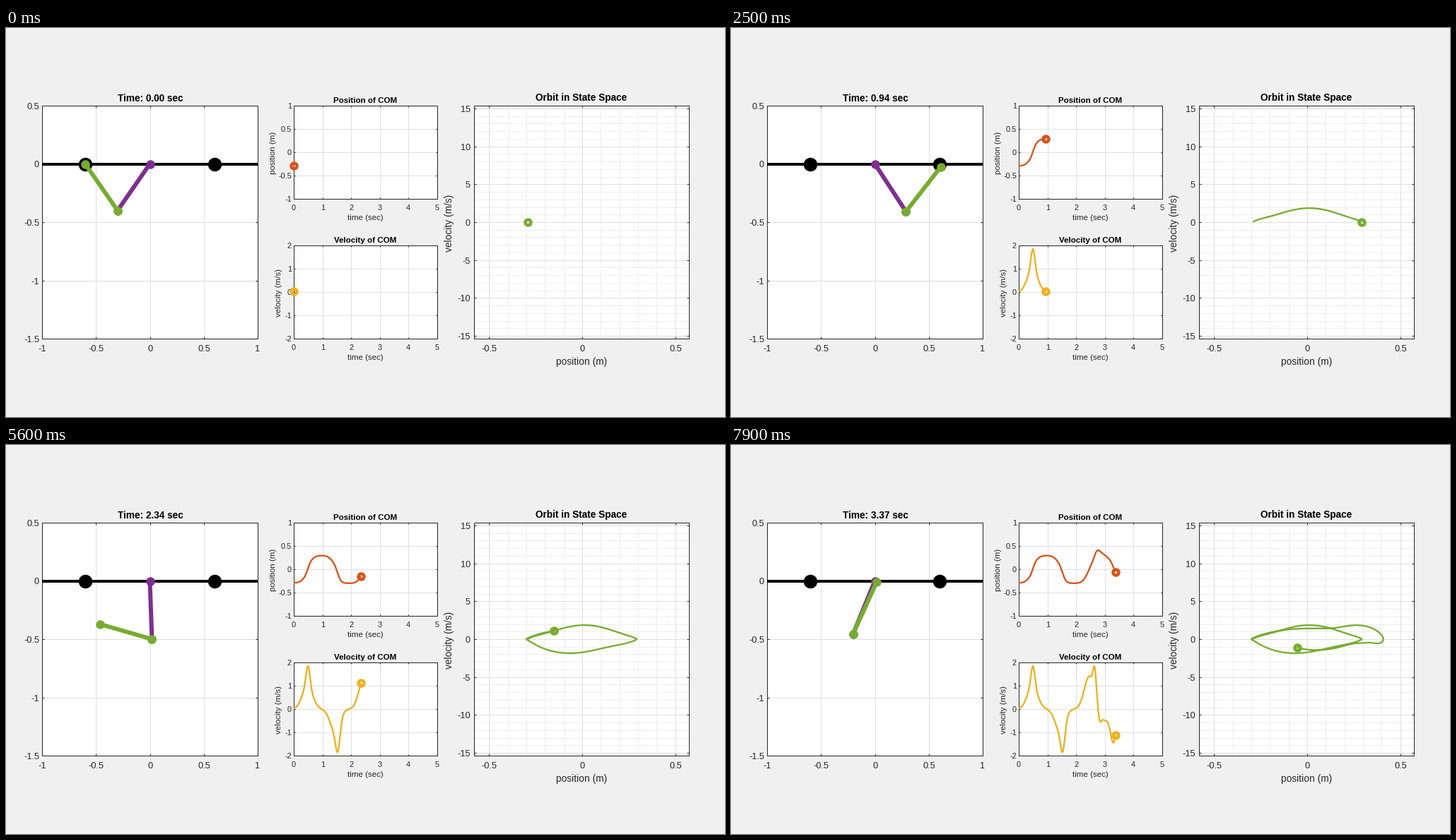
Recreate the animation shown at these times as a matplotlib script. Size 1017 by 551 pixels, loop 8000 ms.

```python
import numpy as np
import matplotlib.pyplot as plt
from matplotlib.animation import FuncAnimation
from matplotlib.collections import LineCollection
from matplotlib.patches import Rectangle

W, H, DPI = 1017, 551, 100
PX = 72 / DPI            # points per pixel
FRAMES, HOLD = 80, 4     # 100 ms each, motion starts after the hold
DT, SUB = 0.04498, 10    # simulated seconds per frame, curve samples per frame
LINK = 0.5
P1, P2 = 0.3185, 0.1685  # share of each link in the centre of mass

INK, GRID, MINOR = "#262626", "#dfdfdf", "#cfcfcf"
ORANGE, YELLOW, GREEN, PURPLE = "#d95319", "#edb120", "#77ac30", "#7e2f8e"

plt.rcParams["font.family"] = "Liberation Sans"
plt.rcParams["axes.unicode_minus"] = False

# ---------------------------------------------------------------- motion

# Each swing is a slow and a quick push: (travel, time, spread).
COM_PUSHES = [
    (.447, .48, .18), (.142, .495, .066),
    (-.384, 1.43, .17), (-.213, 1.535, .078),
    (.618, 2.46, .175), (.138, 2.645, .054),
    (-.062, 2.82, .055), (-.168, 2.99, .14), (-.369, 3.3, .105),
]
OUTER_PUSHES = [  # degrees, link angle from straight down
    (232, .5, .25), (68, .545, .085),
    (-232, 1.5, .25), (-72, 1.57, .142),
    (270, 2.6, .28), (50, 2.63, .06), (-35, 3.4, .08),
]


def swing(start, pushes, t):
    """Value and rate of a quantity driven by bell-shaped pushes."""
    rate = sum(d / (s * np.sqrt(2 * np.pi)) * np.exp(-((t - c) / s) ** 2 / 2)
               for d, c, s in pushes)
    step = (rate[1:] + rate[:-1]) / 2 * np.diff(t)
    return start + np.concatenate([[0], np.cumsum(step)]), rate


def reach(angle):
    return LINK * np.array([np.sin(angle), -np.cos(angle)])


steps = FRAMES - 1 - HOLD
time = np.linspace(0, steps * DT, steps * SUB + 1)
pos, vel = swing(-.292, COM_PUSHES, time)
outer = np.radians(swing(-143.1, OUTER_PUSHES, time)[0])
# the inner link follows from the centre of mass
inner = np.arcsin(np.clip((pos - P2 * np.sin(outer)) / P1, -1, 1))
elbow = reach(inner)
tip = elbow + reach(outer)

# ---------------------------------------------------------------- stage

fig = plt.figure(figsize=(W / DPI, H / DPI), dpi=DPI, facecolor="#f0f0f0")
ax = fig.add_axes([0, 0, 1, 1])
ax.set_xlim(0, W)
ax.set_ylim(H, 0)
ax.axis("off")


def text(x, y, s, size, color=INK, **kw):
    kw = {"ha": "center", "va": "baseline", **kw}
    return ax.text(x, y, s, fontsize=size * PX, color=color, **kw)


def segments(lines, color, z, style="solid"):
    ax.add_collection(LineCollection(lines, colors=color, linewidths=PX,
                                     linestyles=style, zorder=z))


class Panel:
    """Boxed axes with grid and ticks, placed in stage pixels."""

    def __init__(self, box, xlim, ylim, xticks, yticks, size, tick, gaps):
        self.box, self.xlim, self.ylim = box, xlim, ylim
        x0, y0, x1, y1 = box
        ax.add_patch(Rectangle((x0, y0), x1 - x0, y1 - y0, fc="white",
                               ec=INK, lw=PX, zorder=1, joinstyle="miter"))
        self.grid(xticks, yticks, GRID, 2)
        marks = []
        for v in xticks:
            x = round(self.x(v))
            marks += [[(x, y0), (x, y0 + tick)], [(x, y1), (x, y1 - tick)]]
            text(x, y1 + gaps[1], f"{v:g}", size)
        for v in yticks:
            y = round(self.y(v))
            marks += [[(x0, y), (x0 + tick, y)], [(x1, y), (x1 - tick, y)]]
            text(x0 - gaps[0], y + .36 * size + .5, f"{v:g}", size, ha="right")
        segments(marks, INK, 3)

    def x(self, v):
        a, b = self.xlim
        return self.box[0] + (v - a) / (b - a) * (self.box[2] - self.box[0])

    def y(self, v):
        a, b = self.ylim
        return self.box[3] - (v - a) / (b - a) * (self.box[3] - self.box[1])

    def grid(self, xs, ys, color, z, style="solid"):
        x0, y0, x1, y1 = self.box
        lines = [[(round(self.x(v)), y0 + 1), (round(self.x(v)), y1 - 1)]
                 for v in xs if x0 + 1 < self.x(v) < x1 - 1]
        lines += [[(x0 + 1, round(self.y(v))), (x1 - 1, round(self.y(v)))]
                  for v in ys if y0 + 1 < self.y(v) < y1 - 1]
        segments(lines, color, z, style)

    def line(self, xs, ys, color, width, z, marker=0):
        return ax.plot(self.x(np.asarray(xs)), self.y(np.asarray(ys)),
                       color=color, lw=width * PX, zorder=z,
                       solid_capstyle="butt", solid_joinstyle="round",
                       marker="o" if marker else None, ms=marker * PX,
                       mew=0)[0]


def title(x, y, s, size):
    return text(x, y, s, size, "black", weight="bold")


def side_label(x, y, s, size):
    text(x, y, s, size, rotation=90, rotation_mode="anchor")


robot = Panel((51, 110, 356, 440), (-1, 1), (-1.5, .5),
              [-1, -.5, 0, .5, 1], [-1.5, -1, -.5, 0, .5], 12.8, 3, (4, 18.5))
small = dict(xlim=(0, 5), xticks=range(6), size=11, tick=2, gaps=(3, 15.5))
track = Panel((407, 110, 610, 242), ylim=(-1, 1),
              yticks=[-1, -.5, 0, .5, 1], **small)
speed = Panel((407, 308, 610, 440), ylim=(-2, 2),
              yticks=[-2, -1, 0, 1, 2], **small)
orbit = Panel((662, 110, 966, 440), (-.581, .573), (-15.35, 15.35),
              [-.5, 0, .5], range(-15, 16, 5), 12.8, 3, (5, 18.5))
orbit.grid([v / 10 for v in range(-5, 6) if v % 5],
           [v for v in range(-15, 16) if v % 5], MINOR, 1.5, (0, (1, 2)))

clock = title(204.5, 103.5, "", 13.6)
title(814, 103.5, "Orbit in State Space", 13.6)
title(508.5, 105.5, "Position of COM", 11.5)
title(508, 303.5, "Velocity of COM", 11.5)
text(508.5, 272, "time (sec)", 11.5)
text(508.5, 470, "time (sec)", 11.5)
text(814.5, 477, "position (m)", 13.7)
side_label(381, 177, "position (m)", 11.5)
side_label(389, 375, "velocity (m/s)", 11.5)
side_label(631, 276, "velocity (m/s)", 13.8)

# ---------------------------------------------------------------- moving parts

robot.line([-1, 1], [0, 0], "black", 4, 4)
robot.line([-.6, .6], [0, 0], "black", 0, 5, 19.5)
upper = robot.line([0, 0], [0, 0], PURPLE, 6, 6, 12.5)
lower = robot.line([0, 0], [0, 0], GREEN, 6, 7, 12.5)

traces = []
for panel, xs, ys, color in ((track, time, pos, ORANGE),
                             (speed, time, vel, YELLOW),
                             (orbit, pos, vel, GREEN)):
    curve = panel.line([], [], color, 2.3, 8)
    dot, = ax.plot([], [], "o", mfc="none", mec=color, ms=8 * PX,
                   mew=4.5 * PX, zorder=9)
    traces.append((curve, dot, panel.x(xs), panel.y(ys)))


def draw(frame):
    k = max(0, frame - HOLD)
    n = k * SUB
    clock.set_text(f"Time: {k * DT:.2f} sec")
    ex, ey = robot.x(elbow[0, n]), robot.y(elbow[1, n])
    upper.set_data([robot.x(0), ex], [robot.y(0), ey])
    lower.set_data([ex, robot.x(tip[0, n])], [ey, robot.y(tip[1, n])])
    for curve, dot, xs, ys in traces:
        curve.set_data(xs[:n + 1], ys[:n + 1])
        dot.set_data([xs[n]], [ys[n]])
    return [clock, upper, lower]


anim = FuncAnimation(fig, draw, frames=FRAMES, interval=100, repeat=True,
                     repeat_delay=0, init_func=lambda: draw(0))
plt.show()
```
